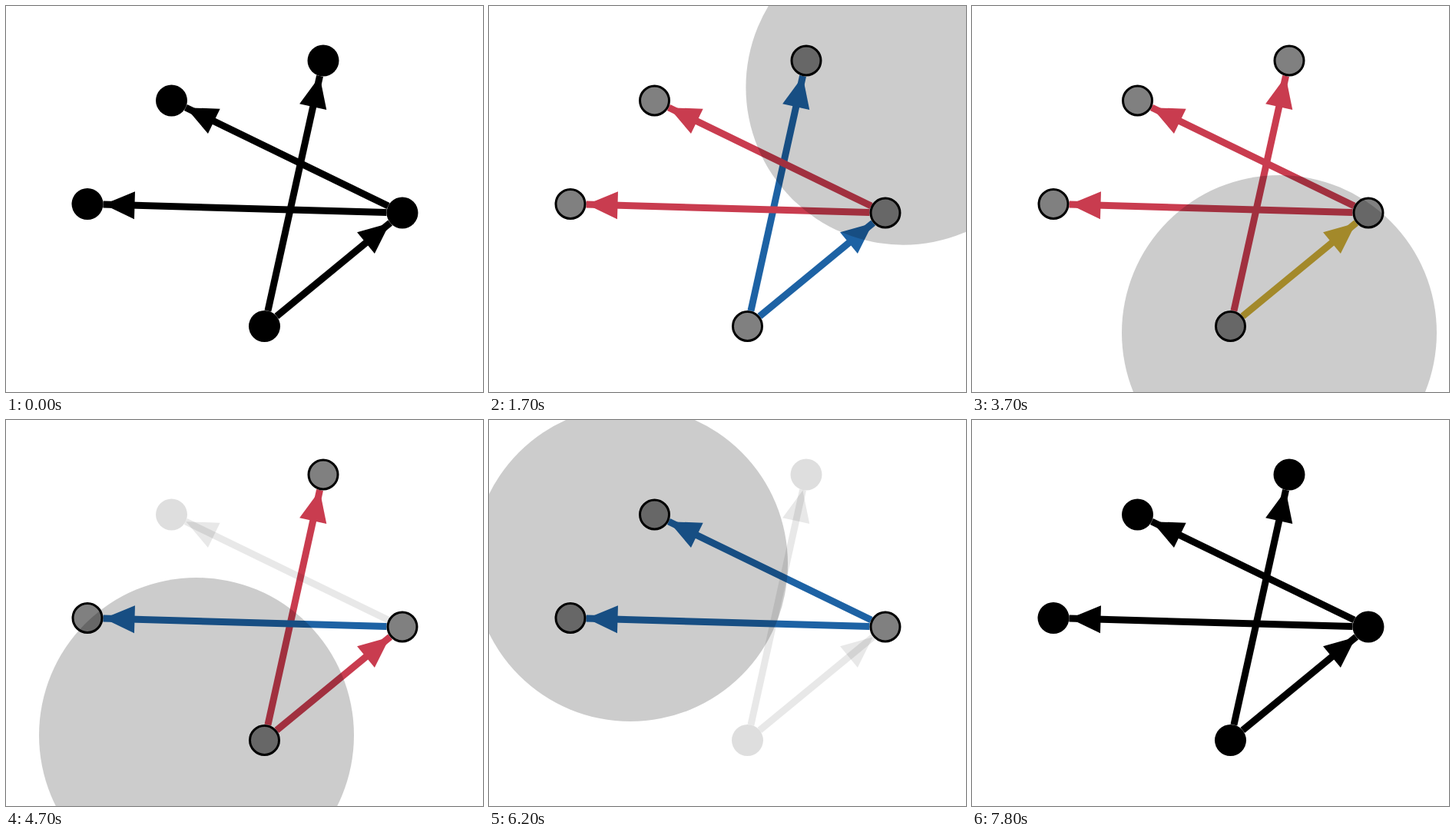
Write an HTML page that moves like this. It is 621 px wide and 502 px high and loops after 8000 ms.

```html
<!DOCTYPE html>
<html lang="en">
<head>
<meta charset="utf-8">
<title>Graph lens</title>
<style>
  html, body { margin: 0; width: 100%; height: 100%; overflow: hidden; background: #fff; }
  svg { display: block; width: 100%; height: 100%; }
</style>
</head>
<body>
<svg id="stage" viewBox="0 0 621 502"></svg>
<script>
const LOOP = 8000, STEP = 100, START = 500, END = 7800;
const LENS_R = 205, NODE_R = 20.5;
const COLORS = { idle: '#000', into: '#1d62a4', out: '#c93c4f', both: '#cbab35', faded: '#000' };

const nodes = {
  left: { x: 106, y: 257.5 },
  upper: { x: 215.5, y: 123 },
  top: { x: 413, y: 71 },
  right: { x: 516, y: 269 },
  bottom: { x: 336.5, y: 416.5 }
};
const edges = [
  ['bottom', 'top'], ['bottom', 'right'], ['right', 'upper'], ['right', 'left']
].map(([from, to]) => ({ from, to }));

// Lens centre: time, x, y
const path = [
  [500, 412, -150], [1000, 456, -84], [1500, 522, 52], [2200, 570, 233],
  [2500, 566, 276], [3100, 513, 375], [3700, 400, 425], [4000, 353, 429],
  [4700, 248, 410], [4900, 209, 398], [5800, 160, 271], [6200, 184, 187],
  [6700, 246, 115], [7200, 380, -20], [7400, 416, -85], [7600, 430, -176],
  [7800, 433, -212]
];

const stage = document.getElementById('stage');
function add(parent, tag, attrs) {
  const el = document.createElementNS('http://www.w3.org/2000/svg', tag);
  set(el, attrs);
  return parent.appendChild(el);
}
function set(el, attrs) {
  for (const key in attrs) el.setAttribute(key, attrs[key]);
}

for (const e of edges) {
  const a = nodes[e.from], b = nodes[e.to];
  const len = Math.hypot(b.x - a.x, b.y - a.y);
  const angle = Math.atan2(b.y - a.y, b.x - a.x) * 180 / Math.PI;
  e.el = add(stage, 'g', { transform: `translate(${a.x} ${a.y}) rotate(${angle})` });
  add(e.el, 'path', { d: `M${NODE_R} -4.5H${len - NODE_R}v9H${NODE_R}z` });
  add(e.el, 'path', { d: `M${len - 21} 0l-40.5 -18v36z` });
}
for (const n of Object.values(nodes)) {
  n.el = add(stage, 'circle', { cx: n.x, cy: n.y });
}
const lens = add(stage, 'circle', { r: LENS_R, fill: '#000', 'fill-opacity': 0.2 });

// Cubic Hermite through the path points
function slope(i, k) {
  const a = path[Math.max(0, i - 1)], b = path[Math.min(path.length - 1, i + 1)];
  return (b[k] - a[k]) / (b[0] - a[0]);
}
function lensAt(t) {
  let i = 0;
  while (i < path.length - 2 && t >= path[i + 1][0]) i++;
  const a = path[i], b = path[i + 1], d = b[0] - a[0], u = (t - a[0]) / d;
  const at = k => {
    const v = 1 - u;
    return v * v * (1 + 2 * u) * a[k] + u * u * (3 - 2 * u) * b[k]
      + d * u * v * (v * slope(i, k) - u * slope(i + 1, k));
  };
  return { x: at(1), y: at(2) };
}

function edgeState(e, active) {
  if (!active) return 'idle';
  const a = active.has(e.from), b = active.has(e.to);
  return a && b ? 'both' : a ? 'out' : b ? 'into' : 'faded';
}

function draw(t) {
  const on = t >= START && t < END;
  let active = null;
  lens.style.display = on ? '' : 'none';
  if (on) {
    const c = lensAt(t);
    set(lens, { cx: c.x, cy: c.y });
    active = new Set(Object.keys(nodes).filter(k =>
      Math.hypot(nodes[k].x - c.x, nodes[k].y - c.y) < LENS_R + NODE_R));
  }
  const lit = new Set(active);
  for (const e of edges) {
    const state = edgeState(e, active);
    set(e.el, { fill: COLORS[state], 'fill-opacity': state === 'faded' ? 0.09 : 1 });
    if (state !== 'faded') lit.add(e.from).add(e.to);
  }
  for (const k in nodes) {
    const ring = active && lit.has(k);
    set(nodes[k].el, {
      r: ring ? 19 : NODE_R,
      fill: ring ? '#808080' : '#000',
      'fill-opacity': lit.has(k) ? 1 : 0.13,
      stroke: ring ? '#000' : 'none',
      'stroke-width': 3
    });
  }
}

const began = performance.now();
function tick() {
  const t = (performance.now() - began) % LOOP;
  draw(Math.floor(t / STEP) * STEP);
  requestAnimationFrame(tick);
}
draw(0);
requestAnimationFrame(tick);
</script>
</body>
</html>
```
